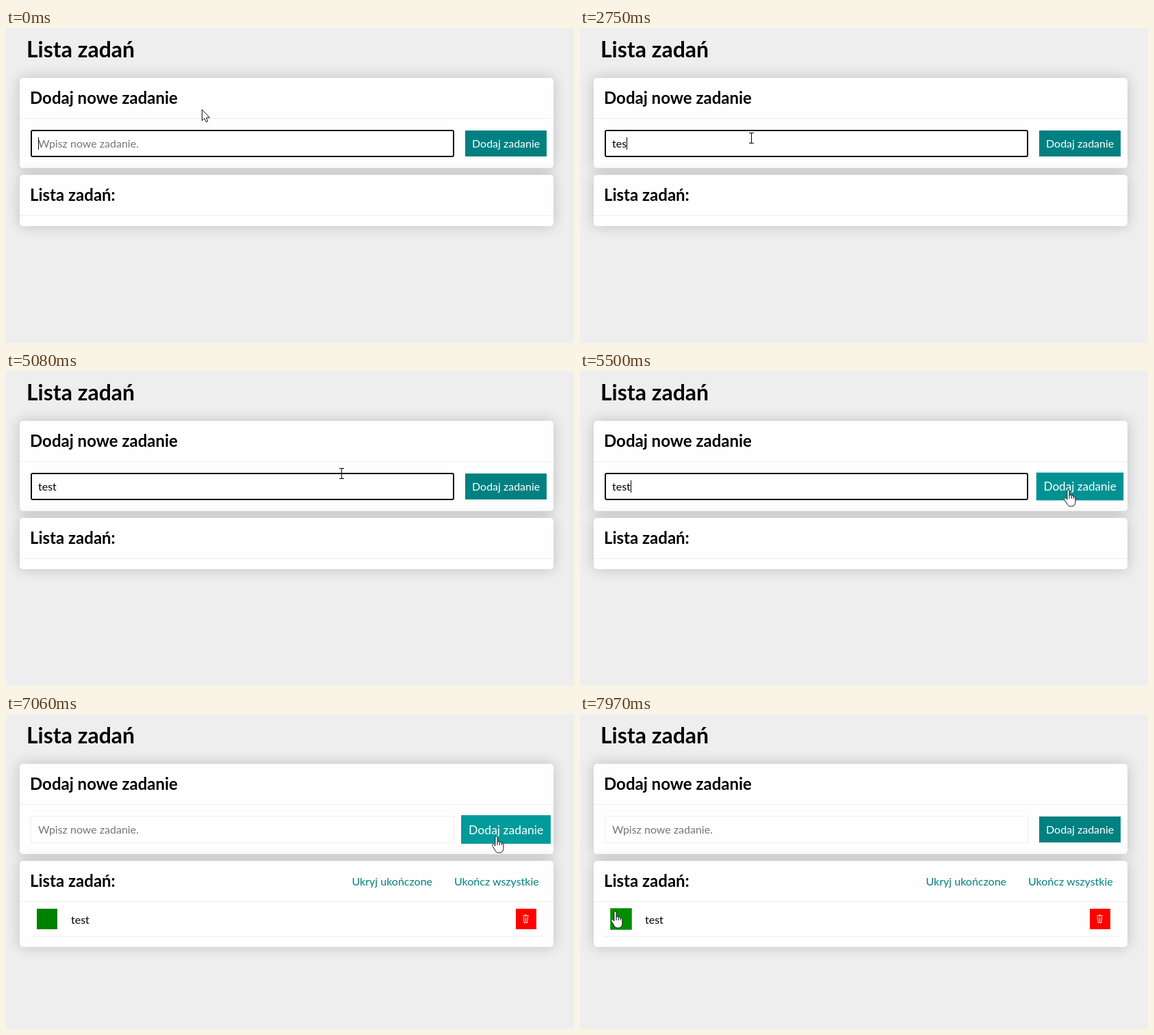
An HTML page that plays this animation: 830x461 px, repeating every 8000 ms.

```html
<!DOCTYPE html>
<html lang="pl">
<head>
<meta charset="utf-8">
<title>Lista zadań</title>
<style>
  html, body { margin: 0; width: 100%; height: 100%; overflow: hidden; background: #eee; }
  .card {
    position: absolute; left: 20px; width: 780px; border-radius: 5px;
    background: #fefefe; box-shadow: 0 0 20px rgba(0, 0, 0, .2);
  }
  #form { top: 73px; height: 132px; }
  #tasks { top: 215px; height: 75px; }
  svg { position: absolute; left: 0; top: 0; font: 16px Lato, sans-serif; }
  .h1 { font-size: 32px; font-weight: 700; }
  .h2 { font-size: 24px; font-weight: 700; }
  .rule { fill: #eee; }
  .link { fill: teal; }
  .cursor { fill: #fff; stroke: #111; stroke-linejoin: round; }
</style>
</head>
<body>
<div class="card" id="form"></div>
<div class="card" id="tasks"></div>
<svg width="830" height="461" viewBox="0 0 830 461">
  <text class="h1" x="30" y="43">Lista zadań</text>
  <text class="h2" x="35" y="111">Dodaj nowe zadanie</text>
  <text class="h2" x="35" y="253">Lista zadań:</text>
  <rect class="rule" x="20" y="132" width="780" height="1"/>
  <rect class="rule" x="20" y="274" width="780" height="1"/>

  <rect id="blurred" x="36.5" y="149.5" width="618" height="39" fill="none" stroke="#eee"/>
  <rect id="focused" x="37" y="150" width="617" height="38" rx="2" fill="#fff" stroke="#101010" stroke-width="2"/>
  <text id="hint" x="47" y="175" fill="#757575">Wpisz nowe zadanie.</text>
  <text id="typed" x="47" y="175"></text>
  <rect id="caret" y="160" width="1" height="18"/>

  <g id="button">
    <rect id="buttonBg" x="671" y="150" width="119" height="38"/>
    <text x="681" y="175" fill="#fff">Dodaj zadanie</text>
  </g>

  <g id="list">
    <text class="link" x="505.5" y="251">Ukryj ukończone</text>
    <text class="link" x="655" y="251">Ukończ wszystkie</text>
    <rect id="done" x="45" y="285" width="30" height="30"/>
    <text x="95" y="307">test</text>
    <rect x="745" y="285" width="30" height="30" fill="red"/>
    <path d="M755 295.5h9M757.5 294h4M756.5 297l.8 8.5h4.4l.8-8.5M759.5 297.5v6.5" fill="none" stroke="#ffe6c8" stroke-width="1.1"/>
    <rect class="rule" x="35" y="325" width="750" height="1"/>
  </g>

  <circle id="click" cx="717" cy="179" r="12" fill="#ff0" opacity=".5"/>
  <g id="pointer">
    <path id="arrow" class="cursor" d="M.5.5V16.5L4 13.2 6.4 18.6 8.9 17.5 6.6 12.2H11.6Z"/>
    <path id="beam" d="M-3.5-7.5h7M0-7.5v15M-3.5 7.5h7" fill="none" stroke="#000"/>
    <g id="hand" class="cursor">
      <path d="M-1.6 14V1.6a1.6 1.6 0 0 1 3.2 0V8.4c0-1.6 3.2-1.6 3.2 0v1c0-1.6 3-1.4 3 .2v1c.2-1.3 2.6-1 2.6.6V17c0 4-2 7-5 7H3c-3 0-4-2-5-4L-5.5 14.5c-1.5-2.4 1-3.8 2.4-2.2Z"/>
      <path d="M1.6 8v5M4.8 9v4M7.8 10v3"/>
    </g>
  </g>
</svg>
<script>
const LOOP = 8000, STEP = 70;
const $ = id => document.getElementById(id);
const show = (id, on) => { $(id).style.display = on ? '' : 'none'; };

// time, x, y, and 1 for a smooth start and stop
const path = [
  [0, 286, 119], [390, 286, 119], [1020, 250.5, 161, 1],
  [4740, 250.5, 161], [4940, 330, 153], [5080, 490, 150], [5220, 640, 156],
  [5290, 681, 163], [5500, 713.5, 174], [5570, 717.5, 179],
  [7050, 717.5, 179], [7060, 716.5, 179], [7830, 78, 287, 1],
  [7900, 56, 289], [7970, 51, 289], [8000, 51, 289]
];
const anchors = [0, 320, 4800, 7060];
const keys = [2090, 2420, 2750, 3130];
const caretX = [47, 52, 61, 68, 74];
const caretOn = [[0, 340], [890, 1420], [1960, 3610], [4140, 4670], [5220, 5710]];
const BLUR = 6130, RELEASE = 6200, ADDED = 6270;

function snap(t) {
  const start = anchors.filter(a => a <= t).pop();
  return start + Math.floor((t - start) / STEP) * STEP;
}

function pointerAt(t) {
  const i = Math.max(1, path.findIndex(k => k[0] > t));
  const [t0, x0, y0] = path[i - 1], [t1, x1, y1, smooth] = path[i];
  let p = (t - t0) / (t1 - t0);
  if (smooth) p = (1 - Math.cos(Math.PI * p)) / 2;
  return [x0 + (x1 - x0) * p, y0 + (y1 - y0) * p];
}

// CSS "ease" over half a second
function ease(ms) {
  const p = Math.min(1, Math.max(0, ms / 500));
  const bez = (u, a, b) => 3 * u * (1 - u) ** 2 * a + 3 * u * u * (1 - u) * b + u ** 3;
  let lo = 0, hi = 1;
  for (let i = 0; i < 20; i++) {
    const mid = (lo + hi) / 2;
    if (bez(mid, .25, .25) < p) lo = mid; else hi = mid;
  }
  return p === 1 ? 1 : bez(lo, .1, 1);
}

function scale(id, cx, cy, hover) {
  $(id).setAttribute('transform', `translate(${cx} ${cy}) scale(${1 + hover * .1}) translate(${-cx} ${-cy})`);
}

const bright = hover => Math.round(128 * (1 + .2 * hover));

function cursorFor(x, y) {
  if (x > 666 && y > 148 && y < 190) return 'hand';
  if (x < 75 && y > 284) return 'hand';
  if (x > 36 && x < 655 && y > 149 && y < 189) return 'beam';
  return 'arrow';
}

function draw(t) {
  const s = snap(t);
  const count = t < ADDED ? keys.filter(k => k <= t).length : 0;

  show('focused', t < BLUR);
  show('blurred', t >= BLUR);
  show('hint', !count);
  $('typed').textContent = 'test'.slice(0, count);
  $('caret').setAttribute('x', caretX[count]);
  show('caret', caretOn.some(([a, b]) => t >= a && t < b));

  const push = ease(s - 5290) - ease(s - 7200);
  scale('button', 730.5, 169, push);
  $('buttonBg').setAttribute('fill', `rgb(0,${bright(push)},${bright(push)})`);

  $('tasks').style.height = t < ADDED ? '75px' : '126px';
  show('list', t >= ADDED);
  const mark = ease(s - 7820);
  scale('done', 60, 300, mark);
  $('done').setAttribute('fill', `rgb(0,${bright(mark)},0)`);

  show('click', t >= BLUR && t < RELEASE);
  const [x, y] = pointerAt(s), kind = cursorFor(x, y);
  for (const id of ['arrow', 'beam', 'hand']) show(id, id === kind);
  const half = kind === 'arrow' ? 0 : .5;
  $('pointer').setAttribute('transform', `translate(${Math.floor(x) + half} ${Math.floor(y)})`);
}

const begin = performance.now();
function tick() {
  draw((performance.now() - begin) % LOOP);
  requestAnimationFrame(tick);
}
tick();
</script>
</body>
</html>
```
